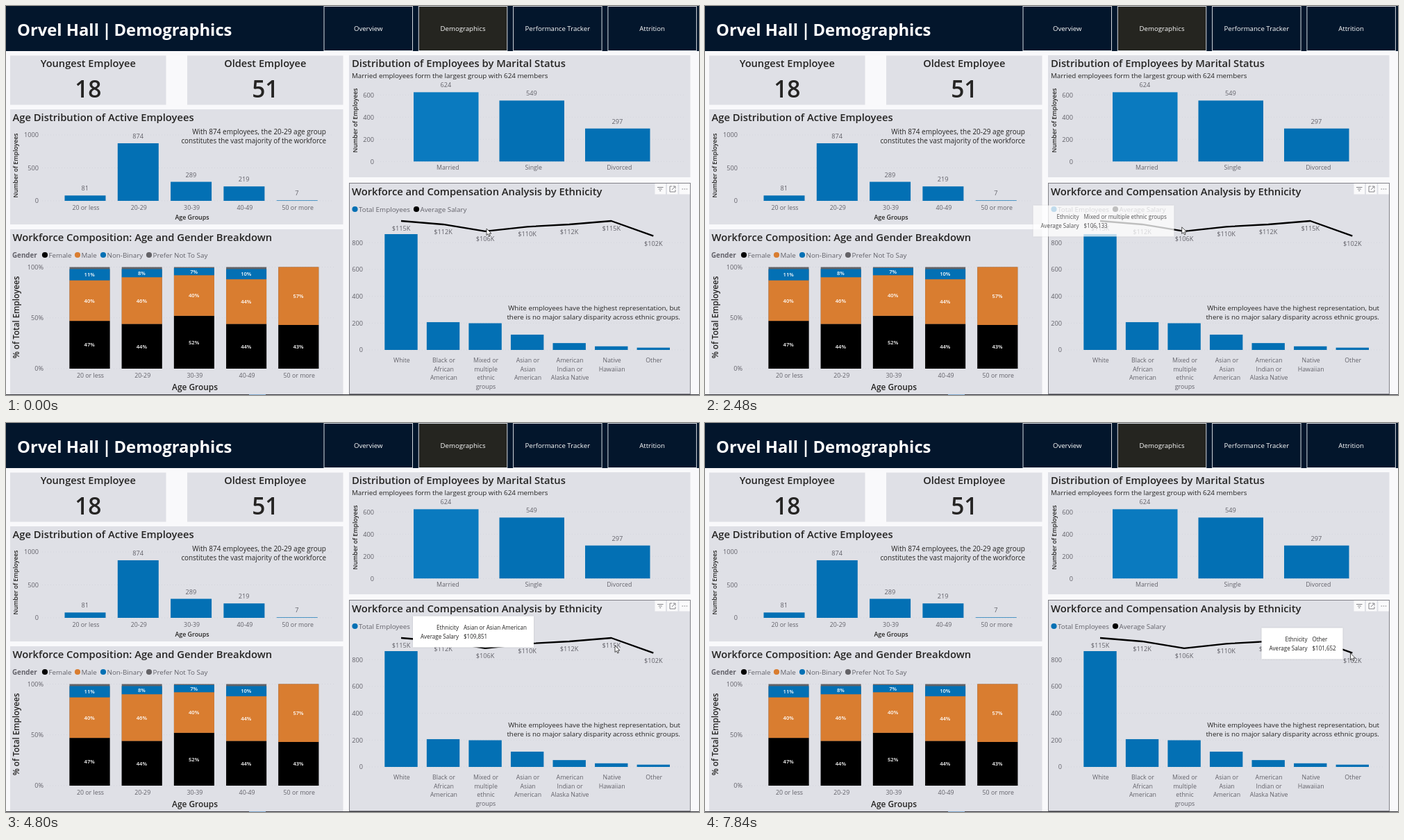
Write an HTML page that moves like this. It is 998 px wide and 561 px high and loops after 8000 ms.

```html
<!DOCTYPE html>
<html lang="en">
<head>
<meta charset="utf-8">
<title>Demographics dashboard</title>
<style>
  html, body { margin: 0; width: 100%; height: 100%; overflow: hidden; background: #f9f9fb; }
  svg { display: block; width: 100vw; height: 100vh; font-family: "Open Sans", "Noto Sans", sans-serif; }
</style>
</head>
<body>
<svg id="stage" viewBox="0 0 998 561"></svg>
<script>
const stage = document.getElementById('stage');
const LOOP = 8000, TICK = 80;
const NAVY = '#03162c', BLUE = '#0370b4', ORANGE = '#d97d30', GRAY = '#636266';
const PANEL = '#dfe0e6', INK = '#252423', MUTED = '#63626a';

function add(tag, attrs, parent = stage) {
  const node = document.createElementNS('http://www.w3.org/2000/svg', tag);
  for (const key in attrs) node.setAttribute(key, attrs[key]);
  parent.append(node);
  return node;
}

function rect(x, y, right, bottom, fill, extra = {}, parent = stage) {
  return add('rect', { x, y, width: right - x, height: bottom - y, fill, ...extra }, parent);
}

// y is the vertical middle of the capitals
function text(str, x, y, size, { fill = INK, weight = 400, anchor = 'start', turn = 0 } = {}, parent = stage) {
  const node = add('text', {
    x, y: y + size * 0.36, fill, 'font-size': size, 'font-weight': weight, 'text-anchor': anchor
  }, parent);
  if (turn) node.setAttribute('transform', `rotate(${turn} ${x} ${y})`);
  node.textContent = str;
}

const mid = (str, x, y, size, opts) => text(str, x, y, size, { anchor: 'middle', ...opts });
const right = (str, x, y, size, opts) => text(str, x, y, size, { anchor: 'end', ...opts });
const title = (str, x, y) => text(str, x, y, 14.75, { weight: 600 });
const axisTitle = (str, x, y, size, turn) => mid(str, x, y, size, { weight: 600, turn });
const category = (str, x, y) => mid(str, x, y, 8.8, { fill: MUTED });
const value = (str, x, y) => mid(str, x, y, 9.2, { fill: MUTED });

// Tick labels and dotted grid lines from zero up to max
function axis(labelX, endX, base, scale, max, step, unit = '') {
  for (let n = 0; n <= max; n += step) {
    const y = base - n * scale;
    right(n + unit, labelX, y, 9.2, { fill: MUTED });
    add('path', {
      d: `M${labelX + 5} ${y}H${endX}`, stroke: '#cfd0d8', 'stroke-width': 0.7, 'stroke-dasharray': '1 3'
    });
  }
}

function legend(items, y) {
  for (const [x, color, label] of items) {
    add('circle', { cx: x, cy: y, r: 4.1, fill: color });
    text(label, x + 5.5, y, 9.8, { fill: MUTED });
  }
}

function drawHeader() {
  rect(0, 0, 998, 65, NAVY);
  const bold = { fill: '#fff', weight: 700 };
  text('Orvel Hall', 16, 34, 23.8, bold);
  mid('|', 145, 34, 23.8, bold);
  text('Demographics', 155.5, 34, 23.8, bold);
  ['Overview', 'Demographics', 'Performance Tracker', 'Attrition'].forEach((label, i) => {
    const x = 458 + i * 136.3;
    rect(x, 0.5, x + 127.5, 64.5, i === 1 ? '#252520' : NAVY, { stroke: '#d5d9df' });
    mid(label, x + 63.7, 33, 9.65, { fill: '#fff' });
  });
}

function drawCards() {
  [['Youngest', 18, 6], ['Oldest', 51, 261]].forEach(([label, age, x]) => {
    rect(x, 71.5, x + 224.5, 142.5, PANEL);
    mid(label + ' Employee', x + 112.3, 82.5, 14.6, { weight: 600 });
    mid(age, x + 112.3, 120, 33.5, { weight: 600 });
  });
}

const ageGroups = ['20 or less', '20-29', '30-39', '40-49', '50 or more'];

function drawAges() {
  rect(6, 149, 485.5, 315, PANEL);
  title('Age Distribution of Active Employees', 9.5, 160.5);
  const base = 281, scale = 0.095;
  axis(47, 472, base, scale, 1000, 500);
  [81, 874, 289, 219, 7].forEach((count, i) => {
    const x = 84.5 + i * 76.3, top = base - count * scale;
    rect(x, top, x + 59, base, BLUE);
    value(count, x + 29.3, top - 10.3);
    category(ageGroups[i], x + 30.5, 290.5);
  });
  right('With 874 employees, the 20-29 age group', 461, 181, 10);
  right('constitutes the vast majority of the workforce', 461, 194.5, 9.9);
  axisTitle('Age Groups', 268, 305, 8.9);
  axisTitle('Number of Employees', 13.5, 230, 8.7, -90);
}

function drawGenders() {
  rect(6, 322, 485.5, 560, PANEL);
  title('Workforce Composition: Age and Gender Breakdown', 9.5, 333.5);
  text('Gender', 9, 359, 9.8, { weight: 700, fill: MUTED });
  legend([[56, '#000', 'Female'], [103, ORANGE, 'Male'], [140, BLUE, 'Non-Binary'],
    [206, GRAY, 'Prefer Not To Say']], 359);
  const base = 523, scale = 1.465;
  axis(54, 472, base, scale, 100, 50, '%');
  const colors = ['#000', ORANGE, BLUE];
  const shares = [[47, 40, 11], [44, 46, 8], [52, 40, 7], [44, 44, 10], [43, 57]];
  shares.forEach((parts, i) => {
    const x = 91.5 + i * 75.2;
    rect(x, base - 100 * scale, x + 58, base, GRAY);
    let bottom = base;
    parts.forEach((share, k) => {
      const top = bottom - share * scale;
      rect(x, top, x + 58, bottom, colors[k]);
      mid(share + '%', x + 28.7, (top + bottom) / 2, 7.6, { fill: '#fff', weight: 600 });
      bottom = top;
    });
    category(ageGroups[i], x + 30, 533);
  });
  axisTitle('Age Groups', 272, 550, 11.9);
  axisTitle('% of Total Employees', 15, 449, 11.7, -90);
}

function drawMarital() {
  rect(494, 71, 985.5, 247, PANEL);
  title('Distribution of Employees by Marital Status', 498, 82.5);
  text('Married employees form the largest group with 624 members', 498, 100, 9.83);
  const base = 224.2, scale = 0.16;
  axis(530, 978, base, scale, 600, 200);
  [['Married', 624], ['Single', 549], ['Divorced', 297]].forEach(([label, count], i) => {
    const x = 587 + i * 123.5, top = base - count * scale;
    rect(x, top, x + 93.5, base, i ? BLUE : '#0a7abf');
    value(count, x + 46.5, top - 10.2);
    category(label, x + 49.3, 233.3);
  });
  axisTitle('Number of Employees', 502.5, 165, 8.7, -90);
}

function drawEthnicity() {
  rect(494.5, 255.5, 985.5, 559.5, PANEL, { stroke: '#77777d', 'stroke-width': 0.9 });
  title('Workforce and Compensation Analysis by Ethnicity', 498, 267.5);
  legend([[502.5, BLUE, 'Total Employees'], [591, '#000', 'Average Salary']], 293);
  const base = 496, scale = 0.1935;
  axis(514, 978, base, scale, 800, 200);
  const groups = [
    [863, 115, 'White'], [207, 112, 'Black or|African|American'],
    [199, 106, 'Mixed or|multiple|ethnic|groups'], [114, 110, 'Asian or|Asian|American'],
    [51, 112, 'American|Indian or|Alaska Native'], [27, 115, 'Native|Hawaiian'], [17, 102, 'Other']
  ];
  const groupX = i => 569 + i * 60.55;
  const salaryY = salary => 310 + (115 - salary) * 1.66;
  groups.forEach(([count, , label], i) => {
    const x = groupX(i);
    rect(x - 23.7, base - count * scale, x + 23.7, base, BLUE);
    label.split('|').forEach((line, k) => category(line, x + 0.9, 511 + k * 12.6));
  });
  add('polyline', {
    points: groups.map(([, salary], i) => `${groupX(i)},${salaryY(salary)}`).join(' '),
    fill: 'none', stroke: '#000', 'stroke-width': 2.3, 'stroke-linejoin': 'round'
  });
  groups.forEach(([, salary], i) => value(`$${salary}K`, groupX(i), salaryY(salary) + 10.8));
  right('White employees have the highest representation, but', 971, 435, 9.83);
  right('there is no major salary disparity across ethnic groups.', 971, 448, 9.83);
  const icons = [
    'M3.5 5.5h8.5M5.3 8h5M6.7 10.5h2',
    'M7 4H4v8h8V9M7 9l4.5-4.5M8.5 4H12v3.5',
    'M4 8h1.6M7.1 8h1.6M10.2 8h1.6'
  ];
  icons.forEach((d, i) => {
    const button = add('g', { transform: `translate(${934.5 + i * 17.5} 256)` });
    rect(0, 0, 15.5, 15.5, '#fafafb', {}, button);
    add('path', { d, fill: 'none', stroke: '#77767c', 'stroke-width': 0.9 }, button);
  });
}

// Fades run over [start, end]; equal to one tick they act as a cut
const tooltips = [
  { x: 472.5, y: 287.5, width: 203, group: 'Mixed or multiple ethnic groups', salary: '$106,133',
    show: [1120, 1440], hide: [2400, 2720] },
  { x: 437.5, y: 276, width: 179.5, group: 'Black or African American', salary: '$112,177',
    show: [3520, 3600], hide: [4720, 4800] },
  { x: 586, y: 278.5, width: 174, group: 'Asian or Asian American', salary: '$109,851',
    show: [4720, 4800], hide: [5120, 5440] },
  { x: 801.5, y: 295.5, width: 117, group: 'Other', salary: '$101,652',
    show: [6160, 6400], hide: [LOOP, LOOP + TICK] }
];

function makeTooltip({ x, y, width, group, salary }) {
  const box = add('g', { opacity: 0, style: 'filter: drop-shadow(0 0 1px #0002)' });
  rect(x, y, x + width, y + 45, '#fff', {}, box);
  [['Ethnicity', group], ['Average Salary', salary]].forEach(([name, detail], i) => {
    const rowY = y + 17 + i * 13;
    text(name, x + 66, rowY, 8.05, { anchor: 'end' }, box);
    text(detail, x + 73, rowY, 8.05, {}, box);
  });
  return box;
}

const pointerStart = { x: 692, y: 321 };
const moves = [
  { span: [80, 720], x: 688, y: 324 },
  { span: [2400, 2720], x: 684, y: 308 },
  { span: [2800, 3040], x: 549, y: 294 },
  { span: [3040, 3440], x: 629, y: 313 },
  { span: [4720, 4800], x: 877, y: 321 },
  { span: [4800, 5040], x: 938, y: 340 },
  { span: [5120, 5680], x: 931.5, y: 332 },
  { span: [7760, 7840], x: 929.5, y: 332 }
];

const progress = (time, [from, to]) => Math.min(1, Math.max(0, (time - from) / (to - from)));
const easeOut = p => 1 - (1 - p) ** 1.35;

function pointerAt(time) {
  let { x, y } = pointerStart;
  for (const move of moves) {
    const p = easeOut(progress(time, move.span));
    x += (move.x - x) * p;
    y += (move.y - y) * p;
  }
  return `translate(${x} ${y})`;
}

drawHeader();
drawCards();
drawAges();
drawGenders();
drawMarital();
drawEthnicity();
rect(0, 560, 998, 561, '#3a3a40');
rect(350, 560, 374, 561, '#7fa6cc');
for (const tip of tooltips) tip.node = makeTooltip(tip);
const arrow = add('path', {
  d: 'M0 0V9.6L2.2 7.6 3.8 11 5.4 10.3 3.9 7H7Z',
  fill: '#fff', stroke: '#222', 'stroke-width': 0.8, 'stroke-linejoin': 'round'
});

const start = performance.now();
function render() {
  const elapsed = (performance.now() - start) % LOOP;
  const time = Math.floor(elapsed / TICK) * TICK;
  for (const { node, show, hide } of tooltips) {
    node.setAttribute('opacity', progress(time, show) - progress(time, hide));
  }
  arrow.setAttribute('transform', pointerAt(time));
  requestAnimationFrame(render);
}
render();
</script>
</body>
</html>
```
